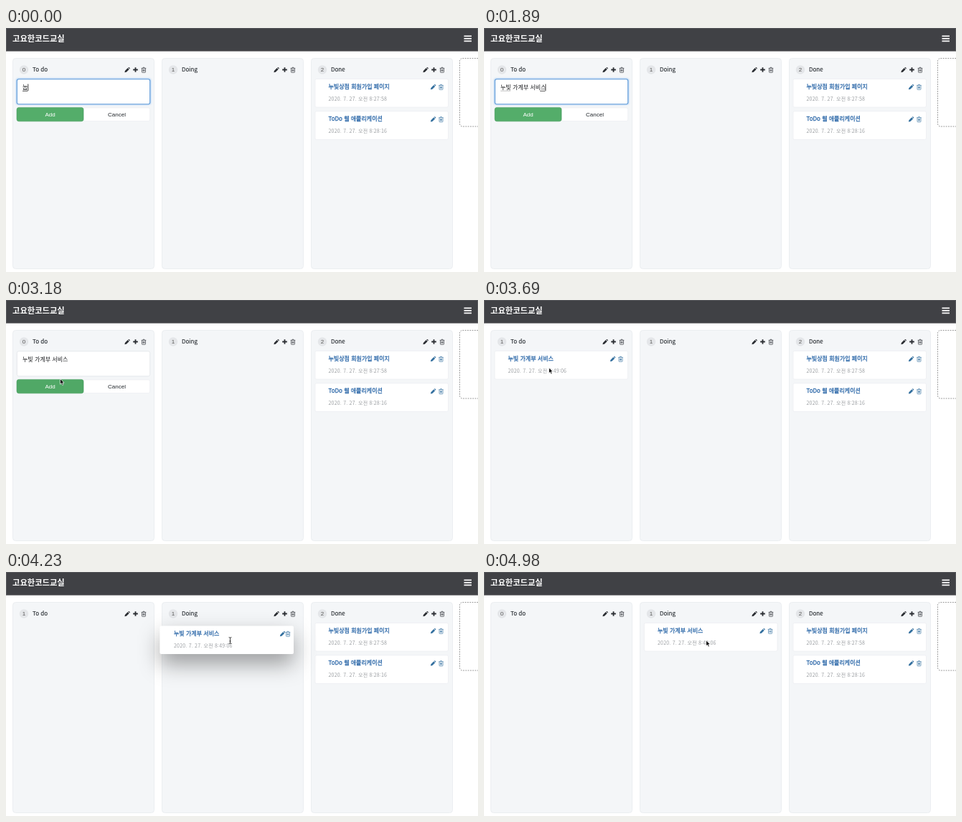
An HTML page for the animation above (5.07 s loop, 658 by 342 pixels).

```html
<!DOCTYPE html>
<html lang="ko">
<head>
<meta charset="utf-8">
<title>Kanban board</title>
<style>
  html, body { margin: 0; width: 100%; height: 100%; overflow: hidden; background: #fff; }
  svg { display: block; width: 100%; height: 100%; }
  text { font-family: "Noto Sans CJK KR", "Noto Sans CJK", "Noto Sans", sans-serif; font-size: 8px; white-space: pre; }
  .brand { font-size: 11.3px; font-weight: 700; fill: #fff; }
  .ui { font-family: "Liberation Sans", Arial, sans-serif; text-anchor: middle; }
  .name { font-size: 8px; fill: #24292e; stroke: #24292e; stroke-width: .12; }
  .title { fill: #2b67a8; stroke: #2b67a8; stroke-width: .28; }
  .date { font-size: 7px; letter-spacing: .2px; fill: #9b9ea2; }
  .col { fill: #f4f6f8; stroke: #ebeef1; }
  .card { fill: #fff; stroke: #eceef1; stroke-width: .8; }
  .dark { color: #2b2e33; }
  .blue { color: #34709f; }
</style>
</head>
<body>
<svg id="stage" viewBox="0 0 658 342" preserveAspectRatio="none">
  <defs>
    <path id="pencil" fill="currentColor" d="M-3.6 3.5L-3.1 1.1L.7-2.8L2.7-.8L-1.1 3ZM1.3-3.3L1.9-3.8Q2.5-4 3.7-2.8Q3.9-2.2 3.3-1.4Z"/>
    <path id="plus" fill="currentColor" d="M-3.3-.9h2.4v-2.4h1.8v2.4h2.4v1.8h-2.4v2.4h-1.8v-2.4h-2.4z"/>
    <path id="trash" fill="none" stroke="currentColor" stroke-width=".65" d="M-3.3-2.4h6.6M-1.2-2.5l.4-1.1h1.6l.4 1.1M-2.5-2.3v5.2q0 .7.7.7h3.6q.7 0 .7-.7v-5.2M-.9-.9v3M0-.9v3M.9-.9v3"/>
    <filter id="blur" x="-20%" y="-50%" width="140%" height="200%"><feGaussianBlur stdDeviation="2.2"/></filter>
    <filter id="soft" x="-40%" y="-150%" width="180%" height="400%"><feGaussianBlur stdDeviation="15"/></filter>
    <filter id="glow" x="-10%" y="-30%" width="120%" height="160%"><feGaussianBlur stdDeviation="1"/></filter>
  </defs>

  <rect width="658" height="32.7" fill="#404145"/>
  <rect x=".5" y=".5" width="657" height="31.8" fill="none" stroke="#fff" stroke-opacity=".12"/>
  <text class="brand" x="9" y="18.7">고요한코드교실</text>
  <path d="M638.5 11.3h10.5M638.5 14.8h10.5M638.5 18.3h10.5" stroke="#fff" stroke-width="1.7"/>
  <rect x="632.5" y="42.5" width="60" height="95.5" rx="4" fill="none" stroke="#666" stroke-width=".7" stroke-dasharray="1.8 1.5"/>

  <g id="board"></g>

  <g id="form">
    <rect id="halo" x="14" y="70.5" width="188" height="37" rx="3.5" fill="#a9cdf5" filter="url(#glow)"/>
    <rect id="area" x="15.3" y="71.8" width="185.4" height="35" rx="2.5" fill="#fff"/>
    <text id="typed" x="23" y="86" fill="#16181b"></text>
    <path id="spell" d="M23.5 88.2h14" stroke="#666" stroke-width=".8" stroke-dasharray="1 1"/>
    <path id="compose" stroke="#222" stroke-width=".8"/>
    <path id="caret" stroke="#111" stroke-width=".8"/>
    <rect x="108" y="111.8" width="92.7" height="18.8" rx="2.5" class="card"/>
    <rect id="add" x="15" y="111.4" width="93" height="19.4" rx="3" stroke="#489c5e" stroke-width=".6"/>
    <text class="ui" x="61.5" y="124" fill="#fff">Add</text>
    <text class="ui" x="154.5" y="124" fill="#24292e">Cancel</text>
  </g>

  <g id="ghost"></g>
  <rect id="shade" width="186" height="40" rx="3" filter="url(#soft)"/>
  <g id="task"></g>

  <path id="arrow" d="M0 0v7.6l1.8-1.6l1.3 2.9l1.4-.6l-1.3-2.8h2.4z" fill="#000" stroke="#fff" stroke-width=".7"/>
  <path id="beam" d="M-1.8-4.5q1.8 0 1.8 1.2v6.6q0 1.2-1.8 1.2M1.8-4.5q-1.8 0-1.8 1.2M0 3.3q0 1.2 1.8 1.2M-1 .9h2" fill="none" stroke="#111" stroke-width=".8"/>
</svg>
<script>
const LOOP = 5070;
const $ = id => document.getElementById(id);
const set = (el, attrs) => { for (const k in attrs) el.setAttribute(k, attrs[k]); };
const show = (el, on) => { el.style.display = on ? '' : 'none'; };
const move = (el, x, y) => el.setAttribute('transform', `translate(${x} ${y})`);

const icon = (name, x, y) => `<use href="#${name}" data-icon="${name}" x="${x}" y="${y}"/>`;

const column = (x, count, name) => `<g>
  <rect class="col" x="${x + .5}" y="42.5" width="197" height="295" rx="4"/>
  <circle cx="${x + 16}" cy="58.5" r="6.2" fill="#e4e6e9"/>
  <text class="ui count" x="${x + 16}" y="61.4" fill="#555">${count}</text>
  <text class="name" x="${x + 28}" y="61.3">${name}</text>
  <g class="dark">${icon('pencil', x + 160, 58.8)}${icon('plus', x + 171.5, 58.5)}${icon('trash', x + 183, 58.8)}</g></g>`;

const cardBox = '<rect class="card" x=".4" y=".4" width="185.6" height="39.6" rx="2"/>';
const cardBody = (title, time) => `
  <text class="title" x="19" y="14.2">${title}</text>
  <text class="date" x="19" y="31">2020. 7. 27. 오전 ${time}</text>
  <g class="blue">${icon('pencil', 165, 11.8)}${icon('trash', 176, 11.8)}</g>`;

const doneCard = (y, title, time) =>
  `<g transform="translate(430.5 ${y})">${cardBox}${cardBody(title, time)}</g>`;

$('board').innerHTML = column(9, 0, 'To do') + column(217, 1, 'Doing') + column(425, 2, 'Done') +
  doneCard(71, '누빛상점 회원가입 페이지', '8:27:58') +
  doneCard(116.3, 'ToDo 웹 애플리케이션', '8:28:16');

const taskBody = cardBody('누빛 가계부 서비스', '8:49:06');
$('task').innerHTML = cardBox + taskBody;
$('ghost').innerHTML = `${cardBox}<g filter="url(#blur)">${taskBody}</g>`;
move($('ghost'), 14.5, 71);

const todo = $('board').firstElementChild;
const todoBox = todo.querySelector('.col');
const todoCount = todo.querySelector('.count');
const todoIcons = [...todo.querySelectorAll('[data-icon]')];
const taskBox = $('task').querySelector('.card');
const taskIcons = [...$('task').querySelectorAll('[data-icon]')];

// [time, settled text, syllable being composed]
const typing = [
  [0, '', '눕'], [60, '누', '비'], [150, '누', '빛'], [330, '누빛 ', ''],
  [450, '누빛 ', 'ㄱ'], [570, '누빛 ', '가'], [690, '누빛 ', '각'], [840, '누빛 가', '계'],
  [960, '누빛 가', '곕'], [1080, '누빛 가계', '부'], [1320, '누빛 가계부 ', ''],
  [1410, '누빛 가계부 ', 'ㅅ'], [1500, '누빛 가계부 ', '서'], [1590, '누빛 가계부 ', '섭'],
  [1680, '누빛 가계부 서', '비'], [1770, '누빛 가계부 서', '빗'], [1860, '누빛 가계부 서비', '스']
];

// [time, x, y]
const pointer = [
  [2130, 112, 126], [2370, 84, 119], [2640, 75.5, 110.5], [3540, 75.5, 110.5], [3690, 90.5, 95],
  [3870, 90.5, 95], [3930, 130, 95], [3990, 188.7, 96], [4080, 245, 96.3], [4170, 300, 96],
  [4230, 312.5, 96], [4560, 312.5, 96], [4800, 309.7, 96]
];
const taskPath = [
  [3900, 14.5, 71], [3990, 56, 74], [4080, 128, 75], [4170, 196, 75], [4230, 215, 75],
  [4470, 215, 75], [4680, 223, 71]
];
const liftPath = [[3900, 0], [3990, 1], [4470, 1], [4740, 0]];

function at(keys, t) {
  if (t <= keys[0][0]) return keys[0].slice(1);
  const i = keys.findIndex(k => k[0] > t);
  if (i < 0) return keys[keys.length - 1].slice(1);
  const a = keys[i - 1], b = keys[i], p = (t - a[0]) / (b[0] - a[0]);
  return a.slice(1).map((v, j) => v + (b[j + 1] - v) * p);
}

const textWidth = s => [...s].reduce((w, c) => w + (c === ' ' ? .224 : .92) * 8, 0);

function drawForm(t) {
  show($('form'), t < 3240);
  const focus = t < 2670;
  const [, fixed, live] = typing.filter(k => k[0] <= t).pop();
  const start = 23 + textWidth(fixed), end = start + textWidth(live);
  $('typed').textContent = fixed + live;
  show($('halo'), focus);
  set($('area'), { stroke: focus ? '#5f9bd8' : '#e1e4e8', 'stroke-width': focus ? 1.1 : .8 });
  show($('spell'), focus && t >= 600);
  show($('compose'), focus && live);
  set($('compose'), { d: `M${start} 88.3H${end}` });
  show($('caret'), focus);
  set($('caret'), { d: `M${end + .4} 78.5v9.5` });
  set($('add'), { fill: t >= 2400 ? '#50a866' : '#54ad6a' });
}

function drawTodo(t) {
  const held = t >= 2700 && t < 2970;
  const grow = held ? 1 : 0;
  set(todoBox, {
    x: 9.5 - grow, y: 42.5 - grow, width: 197 + 2 * grow, height: 295 + 2 * grow
  });
  todoBox.style.filter = held ? 'drop-shadow(0 1px 1.5px rgba(0,0,0,.14))' : 'none';
  const places = held ? [180, 187, 193.7] : [169, 180.5, 192];
  todoIcons.forEach((el, i) => el.setAttribute('x', places[i]));
  todoCount.textContent = t >= 3240 && t < 4470 ? 1 : 0;
}

function drawTask(t) {
  const [x, y] = at(taskPath, t), [lift] = at(liftPath, t);
  const held = t >= 3900 && t < 4470;
  show($('task'), t >= 3240);
  move($('task'), x, y);
  set(taskBox, { x: .4 - lift, width: 185.6 + lift, 'stroke-opacity': 1 - lift });
  const places = held ? [170.5, 178] : [165, 176];
  taskIcons.forEach((el, i) => el.setAttribute('x', places[i]));
  show($('shade'), lift > 0);
  set($('shade'), { x, y: y + 14, 'fill-opacity': .37 * lift });
  show($('ghost'), t >= 3900 && t < 4040);
}

function drawPointer(t) {
  const [x, y] = at(pointer, t);
  const text = t >= 4170 && t < 4620;
  show($('arrow'), t >= 2130 && !text);
  show($('beam'), text);
  move($('arrow'), x, y);
  move($('beam'), x, y);
}

const origin = performance.now();
function frame(now) {
  const t = Math.max(0, now - origin) % LOOP;
  drawForm(t);
  drawTodo(t);
  drawTask(t);
  drawPointer(t);
  requestAnimationFrame(frame);
}
frame(origin);
</script>
</body>
</html>
```
